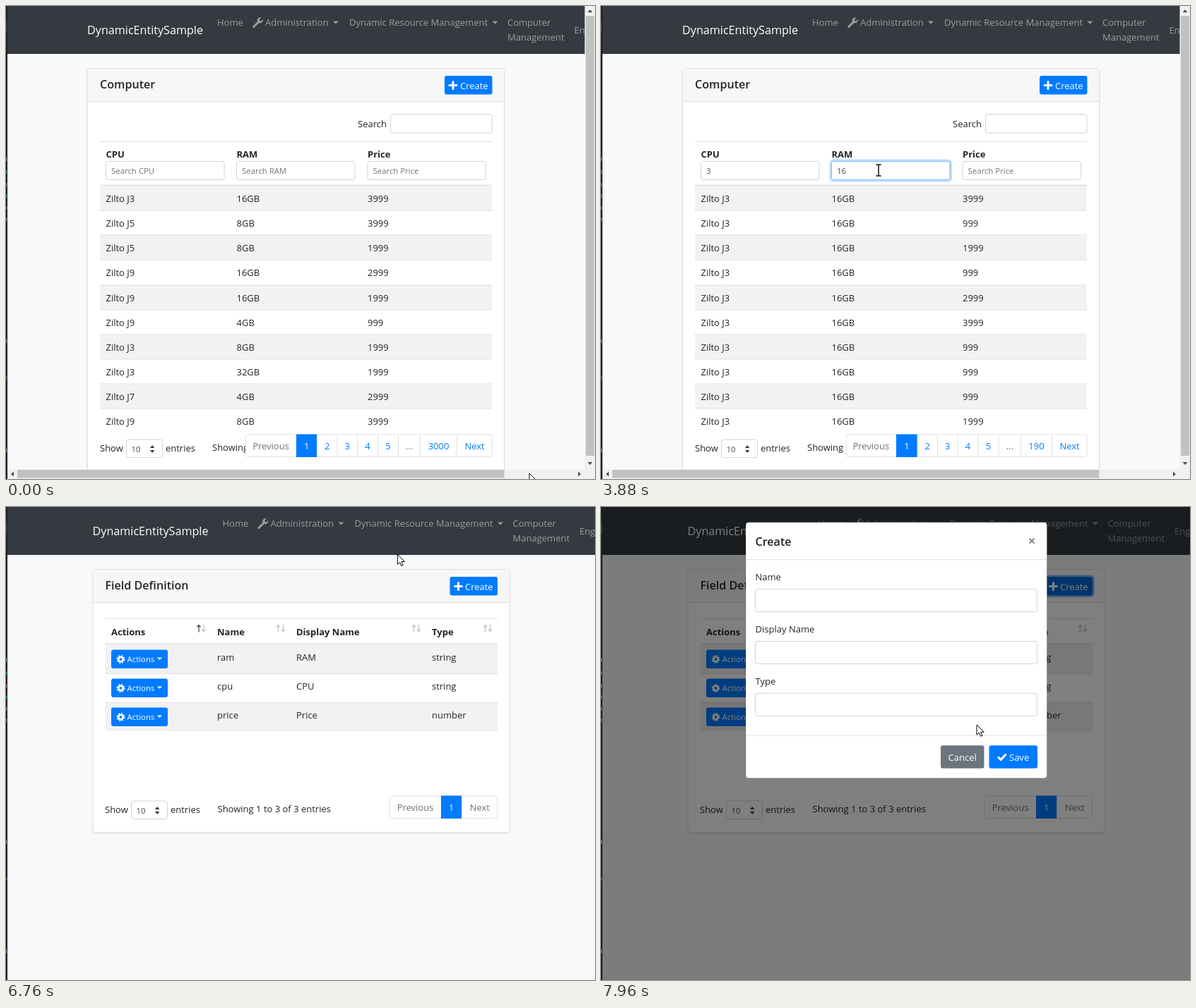
An HTML page for the animation above (8 s loop, 834 by 671 pixels).

```html
<!DOCTYPE html>
<html lang="en">
<head>
<meta charset="utf-8">
<title>Computer list</title>
<style>
html, body { margin: 0; width: 100%; height: 100%; overflow: hidden; background: #f8f9fa; }
svg { display: block; width: 100%; height: 100%; }
text { font: 13px "Open Sans", "Noto Sans", sans-serif; fill: #212529; white-space: pre; }
.brand { font-size: 16.15px; fill: #fff; }
.nav text, .nav path { fill: #fff; opacity: .5; }
.nav .brand { opacity: 1; }
.nav .hover * { opacity: .75; }
.title { font-size: 16.1px; font-weight: 600; }
.head { font-weight: 700; }
.small { font-size: 11.4px; }
.item { font-size: 11.85px; }
.white { fill: #fff; }
.blue { fill: #007bff; }
.grey { fill: #6c757d; }
.value { font-size: 11.4px; fill: #495057; }
.mid { text-anchor: middle; }
.status { font: 11px "Noto Sans CJK SC", "Noto Sans CJK", sans-serif; fill: #222; }
</style>
</head>
<body>
<svg id="stage" viewBox="0 0 834 671" xmlns="http://www.w3.org/2000/svg"></svg>
<script>
const LOOP = 8000, BLUE = '#007bff', LINE = '#dee2e6';

// ---- drawing helpers ----
const text = (x, y, s, cls = '') => `<text x="${x}" y="${y}" class="${cls}">${s}</text>`;
const rect = (x, y, w, h, fill, more = '') =>
  `<rect x="${x}" y="${y}" width="${w}" height="${h}" fill="${fill}" ${more}/>`;
const path = (d, fill, more = '') => `<path d="${d}" fill="${fill}" ${more}/>`;
const group = (id, body, more = '') => `<g id="${id}" ${more}>${body}</g>`;
const outline = (x, y, w, h, stroke, fill = '#fff') =>
  rect(x + .5, y + .5, w - 1, h - 1, fill, `stroke="${stroke}" rx="3"`);
const field = (x, y, w, h) => outline(x, y, w, h, '#ced4da');
const caret = (x, y) => path(`M${x} ${y}h8l-4 4z`, '#fff');
const plus = (x, y) => path(`M${x - 5} ${y}h10M${x} ${y - 5}v10`, 'none',
  'stroke="#fff" stroke-width="3" stroke-linecap="round"');

function nav(width, dx, id) {
  return rect(0, 0, width, 68, '#343a40') + `<g class="nav" transform="translate(${dx})">` +
    text(115, 40, 'DynamicEntitySample', 'brand') + text(299, 28, 'Home') +
    path('M349.5 28.5l6.5-6.5a4.3 4.3 0 0 1 5.4-5.6l-2.6 2.6.4 2 2 .4 2.5-2.6a4.3 4.3 0 0 1-5.5 5.3l-6.4 6.4a1.5 1.5 0 0 1-2.3-2z', '#fff') +
    text(367, 28, 'Administration') + caret(463, 21.5) +
    group(id, text(486, 28, 'Dynamic Resource Management') + caret(688.5, 21.5)) +
    text(710, 28, 'Computer') + text(710, 49, 'Management') + text(804.5, 39, 'English') + '</g>';
}

function card(x, h, title) {
  return rect(x + .5, 88.5, 590, h, '#fff', 'rx="3.5" stroke="#dfdfdf" filter="url(#soft)"') +
    rect(x + 1, 89, 589, 46, '#f7f7f7') + rect(x + 1, 135, 589, 1, '#dfdfdf') +
    text(x + 18, 116.5, title, 'title');
}

function pager(y, edges, labels, disabled) {
  const right = edges[edges.length - 1];
  return outline(edges[0], y, right - edges[0], 32.5, LINE) + labels.map((s, i) => {
    const x = edges[i], w = edges[i + 1] - x, on = i === 1;
    const cls = on ? 'white' : disabled.includes(s) ? 'grey' : 'blue';
    return (on ? rect(x, y, w, 32.5, BLUE) : i ? rect(x - .5, y, 1, 32.5, LINE) : '') +
      text(x + w / 2, y + 21.3, s, 'mid ' + cls);
  }).join('');
}

const lengthMenu = (x, y) => text(x, y, 'Show') + field(x + 37, y - 17.5, 52, 26.5) +
  text(x + 44.5, y + 1, '10', 'value') + text(x + 93, y, 'entries') +
  path(`M${x + 71} ${y - 5}l3.2-4 3.2 4zM${x + 71} ${y - 2}l3.2 4 3.2-4z`, '#343a40');

// ---- computer list ----
const COLS = [141.5, 326.5, 512];
const price = d => d === '0' ? '999' : d + '999';

function rows(id, cpu, ram, prices, edges, total) {
  const body = ram.map((gb, i) => {
    const y = 278 + 35.15 * i;
    return text(COLS[0], y, 'Zilto J' + cpu[i]) + text(COLS[1], y, gb + 'GB') + text(COLS[2], y, price(prices[i]));
  }).join('');
  return group(id, body + pager(607.5, edges, ['Previous', '1', '2', '3', '4', '5', '...', total, 'Next'], ['Previous', '...']));
}

function stripes() {
  let s = rect(133, 192, 555, 1, LINE) + rect(133, 253.5, 555, 1.7, LINE);
  for (let i = 0; i < 10; i++) {
    const y = 255 + 35.15 * i;
    if (i % 2 === 0) s += rect(133, y, 555, 35.15, '#f2f2f2');
    if (i) s += rect(133, Math.round(y) - .5, 555, 1, LINE);
  }
  return s;
}

function filters() {
  return ['CPU', 'RAM', 'Price'].map((s, i) => {
    const x = COLS[i] - .5, ring = rect(x + .5, 220.5, 167.5, 26, '#fff', 'rx="3" stroke="#80bdff"') +
      rect(x - 1.2, 218.8, 170.9, 29.4, 'none', 'rx="4" stroke="#007bff" stroke-opacity=".25" stroke-width="2.6"');
    return text(COLS[i], 215, s, 'head') + field(x, 220, 168.5, 27) + group('ring' + s, ring) +
      group('hint' + s, text(x + 8, 238, 'Search ' + s, 'small grey')) +
      text(x + 8, 238, `<tspan id="value${s}"></tspan>`, 'value') +
      rect(0, 226, 1, 15, '#222', `id="caret${s}"`);
  }).join('');
}

const edgesA = [339, 411, 440.5, 469, 497.5, 526.5, 555.5, 586.5, 638.5, 688.5];
const edgesB = [346.5, 418, 448, 476.5, 505, 534, 563, 594.5, 638.5, 688.5];
const scrollbars =
  rect(819.5, 0, 14.5, 671, '#f1f1f1') + rect(0, 657, 834, 14, '#f1f1f1') +
  rect(821, 14, 12, 624, '#c1c1c1') + rect(16, 658, 689.5, 11.5, '#c1c1c1') +
  path('M823.5 9l3.5-4 3.5 4zM823.5 647l3.5 4 3.5-4z', '#505050') +
  path('M11 660.5l-4 3.5 4 3.5zM810 660.5l4 3.5-4 3.5z', '#505050');

const listPage = rect(0, 0, 834, 671, '#f8f9fa') + nav(820, 0, 'menu') + card(115, 620, 'Computer') +
  rect(621, 99, 67.5, 26.5, BLUE, 'rx="3"') + plus(633, 112.5) + text(643, 117.5, 'Create', 'white') +
  text(498, 171.5, 'Search') + field(544, 153, 144.5, 27.5) + stripes() + filters() +
  lengthMenu(133, 632) + text(292, 631, 'Showing') +
  rows('tableA', '3559993379', [16, 8, 8, 16, 16, 4, 8, 32, 4, 8], '3312101123', edgesA, '3000') +
  rows('tableB', '3333333333', [16, 8, 32, 8, 16, 8, 16, 32, 4, 16], '3113001300', edgesB, '747') +
  rows('tableC', '3333333333', Array(10).fill(16), '3010230001', edgesB, '190') +
  group('busy', outline(325, 374, 171, 28, '#dfdfdf') + text(410.5, 392.5, 'Processing...', 'mid')) +
  group('drop', rect(478.5, 40.5, 179.5, 75, '#fff', 'rx="3.5" stroke="#d9d9d9" filter="url(#soft)"') +
    rect(479, 41, 178.5, 36.5, '#f8f9fa', 'id="dropHover"') +
    text(491.5, 63, 'Field Definition', 'item') + text(491.5, 101, 'Model Definition', 'item')) +
  scrollbars +
  group('status', path('M2 653.5H273q4 0 4 4V671H2z', '#dee1e6', 'stroke="#c4c7cc"') +
    text(6, 666, '正在等待 localhost 的响应...', 'status'));

// ---- field definitions ----
const sorter = (x, first) => [[x, 'M0 11V1M-2.5 4L0 1L2.5 4', first], [x + 7, 'M0 0V10M-2.5 7L0 10L2.5 7', false]]
  .map(([px, d, dark]) => path(d, 'none', `transform="translate(${px} 166.5)" stroke="${dark ? '#444' : '#c4c4c4'}" stroke-width="1.2"`)).join('');

const gear = (x, y) => `<g transform="translate(${x} ${y})" fill="none" stroke="#fff">` +
  '<circle r="3.2" stroke-width="2.6"/><circle r="5" stroke-width="2" stroke-dasharray="1.96"/></g>';

function fieldRows() {
  return [['ram', 'RAM', 'string'], ['cpu', 'CPU', 'string'], ['price', 'Price', 'number']].map((r, i) => {
    const y = 195 + 41 * i;
    return (i % 2 ? '' : rect(140.5, y, 555.5, 41, '#f2f2f2')) + (i ? rect(140.5, y, 555.5, 1, LINE) : '') +
      rect(149, y + 7.5, 80, 26.5, BLUE, 'rx="3"') + gear(162.5, y + 21) +
      text(171.5, y + 25.3, 'Actions', 'small white') + caret(214, y + 18.5).replace('h8l-4 4', 'h7l-3.5 3.5') +
      r.map((s, k) => text([299, 411, 603][k], y + 23, s)).join('');
  }).join('');
}

const fieldPage = rect(0, 0, 834, 671, '#f8f9fa') + nav(834, 7.5, 'menu2') + card(122.5, 373, 'Field Definition') +
  group('focus', rect(627.3, 97.8, 70, 28.9, 'none', 'rx="4.5" stroke="#007bff" stroke-opacity=".5" stroke-width="2.7"')) +
  rect(628.5, 99, 67.5, 26.5, BLUE, 'rx="3" id="create"') + plus(640.5, 112.5) + text(650, 117.5, 'Create', 'white') +
  rect(140.5, 158, 555.5, 1, LINE) + rect(140.5, 193.5, 555.5, 1.7, LINE) +
  [['Actions', 149, 273], ['Name', 299, 385.5], ['Display Name', 411, 577.5], ['Type', 603, 678.5]]
    .map(([s, x, sx], i) => text(x, 182, s, 'head') + sorter(sx, i === 0)).join('') +
  fieldRows() + lengthMenu(140, 434) + text(299.5, 433, 'Showing 1 to 3 of 3 entries') +
  pager(409.5, [543, 616, 645.5, 696], ['Previous', '1', 'Next'], ['Previous', 'Next']);

const modal = rect(205, 22.5, 426.5, 363, '#fff', 'rx="4" stroke="#000" stroke-opacity=".2"') +
  text(218.5, 55.5, 'Create', 'title') +
  path('M606.5 45.5l7 7m0-7l-7 7', 'none', 'stroke="#7f7f7f" stroke-width="2"') +
  rect(205.5, 75, 425.5, 1, LINE) + rect(205.5, 324.5, 425.5, 1, LINE) +
  ['Name', 'Display Name', 'Type'].map((s, i) =>
    text(218.5, 105 + 73.8 * i, s) + field(218, 117 + 73.8 * i, 400, 33)).join('') +
  rect(481, 339, 61.5, 32.5, '#6c757d', 'rx="3"') + text(511.7, 360.5, 'Cancel', 'white mid') +
  rect(549.5, 339, 68.5, 32.5, BLUE, 'rx="3"') + text(578, 360.5, 'Save', 'white') +
  path('M562 355.5l4 4 7.5-8', 'none', 'stroke="#fff" stroke-width="3"');

// thin sliver of the window behind
const sliver = rect(0, 0, 2, 671, '#1e1e1e') + rect(0, 22, 1, 16, '#4a4a4a') +
  [[217, '#6f9fbf'], [235, '#3f8f9f'], [253, '#7a8a8f'], [269, '#3f8f9f'], [286, '#8a8a8a'], [302, '#8a8a8a'],
   [475, '#9a9a9a'], [527, '#7f6050'], [630, '#9a9a70']].map(([y, c]) => rect(0, y - 2, 1, 5, c)).join('');

const ibeam = 'M-3.5 -8h2.5l1 1 1-1h2.500M0 -7V7M-3.500 8h2.500l1-1 1 1h2.500';
const pointer = group('arrow', path('M0 0V14.300L3.300 11.200L5.600 16.300L7.900 15.300L5.600 10.300H10.200Z', '#fff', 'stroke="#000" stroke-width="1"')) +
  group('beam', path(ibeam, 'none', 'stroke="#fff" stroke-width="3"') + path(ibeam, 'none', 'stroke="#000" stroke-width="1.400"')) +
  group('hand', path('M-1.500 1Q0-1 1.500 1V6Q3 5 4.200 6.300Q5.500 5.500 6.600 7Q8.600 6.500 8.600 9V12Q8 14 7 16H-1.500Q-2.500 13.500-5 10.500Q-5 8-2.800 9L-1.500 10.500Z', '#fff', 'stroke="#000" stroke-width="1.100"') +
    path('M1.500 6V9M4.200 6.500V9M6.600 7V9.500', 'none', 'stroke="#000"'));

const stage = document.getElementById('stage');
stage.innerHTML = '<defs><filter id="soft"><feDropShadow dx="0" dy="1.5" stdDeviation="1.6" flood-opacity=".08"/></filter></defs>' +
  group('list', listPage) + group('fields', fieldPage) +
  rect(0, 0, 834, 671, '#000', 'id="shade"') + group('modal', modal) + sliver + group('pointer', pointer);

// ---- motion ----
const el = {};
stage.querySelectorAll('[id]').forEach(n => el[n.id] = n);
const show = (id, on) => el[id].style.display = on ? '' : 'none';
const fade = (id, a) => { show(id, a > 0); el[id].style.opacity = a; };
const ramp = (t, from, ms) => Math.min(1, Math.max(0, (t - from) / ms));
const during = (t, a, b) => t >= a && t < b;

const TRACK = [
  [0, 741, 663], [80, 741, 663], [800, 186, 234], [1080, 186, 234], [1200, 184, 233], [1560, 184, 233],
  [2160, 388, 234], [2320, 388, 234], [2480, 393, 233], [3880, 393, 233], [4160, 281, 558], [4320, 281, 558],
  [5000, 507, 68], [5120, 517, 30], [5280, 524, 24], [5440, 524, 24], [5840, 529, 59], [6480, 529, 59],
  [7360, 668, 104], [7720, 668, 104], [7960, 532, 309]
];

function track(t) {
  let i = 1;
  while (i < TRACK.length - 1 && TRACK[i][0] < t) i++;
  const [t0, x0, y0] = TRACK[i - 1], [t1, x1, y1] = TRACK[i];
  const p = ramp(t, t0, t1 - t0), e = p * p * (3 - 2 * p);
  return [x0 + (x1 - x0) * e, y0 + (y1 - y0) * e];
}

function setFilter(name, value, focus, caretOn, x) {
  el['value' + name].textContent = value;
  show('hint' + name, !value);
  fade('ring' + name, focus);
  show('caret' + name, caretOn);
  el['caret' + name].setAttribute('x', x + value.length * 6.5);
}

function render(t) {
  // the screen was sampled every 80 ms
  const q = t < 7680 ? Math.floor(t / 80) * 80 : 40 + Math.floor((t - 40) / 80) * 80;
  const [x, y] = track(q), onList = t < 6400;
  const open = during(t, 5320, 6400);
  const inside = (l, top, r, b) => x >= l && x <= r && y >= top && y <= b;
  const onMenu = inside(480, 14, 700, 36), onItem = open && inside(478, 41, 658, 78);
  const onCreate = inside(628, 99, 697, 126);

  show('list', onList);
  show('fields', !onList);
  show('tableA', t < 1800);
  show('tableB', during(t, 1800, 3560));
  show('tableC', t >= 3560);
  show('busy', during(t, 1560, 1800) || during(t, 3000, 3560));
  setFilter('CPU', t < 1480 ? '' : '3', ramp(q, 720, 120) - ramp(q, 2100, 120),
    during(t, 840, 1080) || during(t, 1480, 2160), 148.5);
  setFilter('RAM', t < 2920 ? '' : t < 3160 ? '1' : '16', ramp(q, 2200, 150) - ramp(q, 4300, 150),
    during(t, 2240, 3560), 334);
  setFilter('Price', '', 0, false, 519);
  el.menu.setAttribute('class', onMenu ? 'hover' : '');
  show('drop', open);
  show('dropHover', onItem);
  show('status', t >= 5960);

  show('focus', t >= 7560);
  el.create.setAttribute('fill', onCreate || t >= 7560 ? '#0069d9' : BLUE);
  fade('shade', .5 * ramp(q, 7582, 150));
  fade('modal', ramp(q, 7690, 150));
  const drop = -43.4 * Math.pow(1 - ramp(q, 7690, 300), 1.7);
  el.modal.setAttribute('transform', `translate(0 ${drop})`);

  const beam = onList && (inside(141, 220, 309, 247) || inside(327, 220, 495, 247));
  const hand = onList ? onMenu || onItem : onCreate && t < 7580;
  show('beam', beam);
  show('hand', hand);
  show('arrow', !beam && !hand);
  show('pointer', !during(t, 1200, 1560) && !during(t, 2920, 3880));
  el.pointer.setAttribute('transform', `translate(${x} ${y})`);
}

let start;
function tick(now) {
  start ??= now;
  render((now - start) % LOOP);
  requestAnimationFrame(tick);
}
render(0);
requestAnimationFrame(tick);
</script>
</body>
</html>
```
